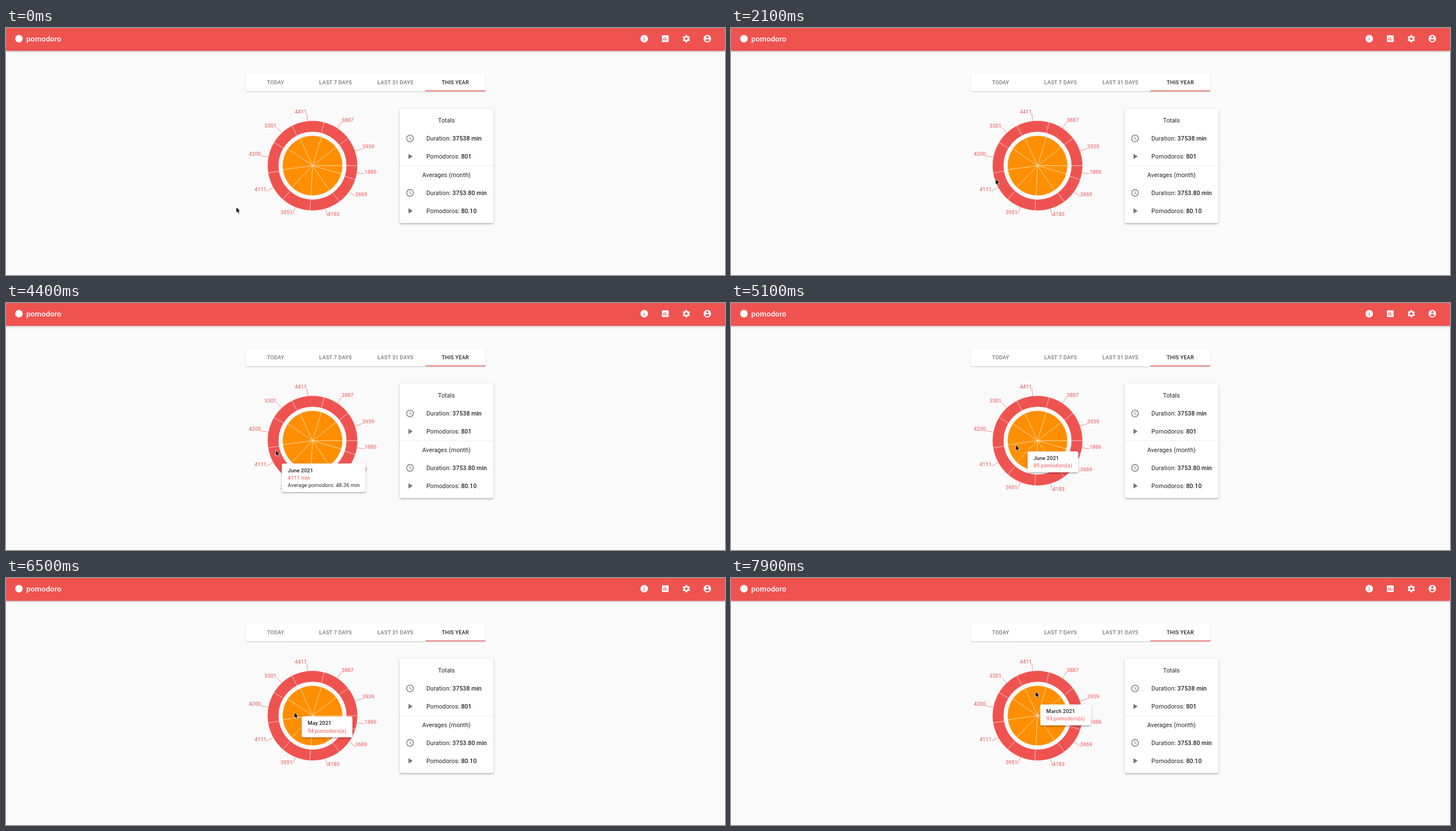
Write an HTML page that moves like this. It is 1276x439 px and loops after 8000 ms.

```html
<!DOCTYPE html>
<html lang="en">
<head>
<meta charset="utf-8">
<title>pomodoro</title>
<style>
html, body { margin: 0; width: 100%; height: 100%; overflow: hidden; background: #fafafa; }
#stage {
  position: absolute; width: 1914px; height: 658.5px; overflow: hidden;
  transform: scale(.666667); transform-origin: 0 0;
  font: 14px Roboto, sans-serif; color: rgba(0,0,0,.87);
}
#stage > * { position: absolute; left: 0; top: 0; }
#stage .bar {
  width: 1914px; height: 60.5px; background: #ef5350;
  box-shadow: 0 2px 4px -1px rgba(0,0,0,.2), 0 4px 5px rgba(0,0,0,.14), 0 1px 10px rgba(0,0,0,.12);
}
.paper {
  background: #fff; border-radius: 4px;
  box-shadow: 0 3px 3px -2px rgba(0,0,0,.2), 0 3px 4px rgba(0,0,0,.14), 0 1px 8px rgba(0,0,0,.12);
}
#stage .tabs {
  left: 638px; top: 120.5px; width: 638px; height: 48px;
  box-shadow: 0 2px 1px -1px rgba(0,0,0,.2), 0 1px 1px rgba(0,0,0,.14), 0 1px 3px rgba(0,0,0,.12);
}
#stage .card { left: 1047.5px; top: 215px; width: 250px; height: 305px; }
#tip { padding: 8px 16px; line-height: 20px; letter-spacing: .01071em; white-space: nowrap; }
#tip b { font-weight: 500; }
#tip div { color: #ef5350; }
svg { overflow: visible; }
text { font-family: Roboto, sans-serif; }
</style>
</head>
<body>
<div id="stage">
  <div class="bar"></div>
  <div class="paper tabs"></div>
  <div class="paper card"></div>
  <svg id="art" width="1914" height="658.5"></svg>
  <div id="tip" class="paper"></div>
  <svg id="cursor" width="14" height="21">
    <path d="M.7 .8V16.5L4.4 13.2 6.9 19 9.6 17.9 7.1 12.2H12Z" stroke="#fff" stroke-width="1.1"/>
  </svg>
</div>
<script>
const RED = '#ef5350', ORANGE = '#ff8f00', GREY = 'rgba(0,0,0,.54)', INK = 'rgba(0,0,0,.87)';
const CX = 816, CY = 367;
const MONTHS = ['January', 'February', 'March', 'April', 'May', 'June', 'July', 'August', 'September', 'October'];
const MINUTES = [3939, 3887, 4411, 3301, 4200, 4111, 3951, 4183, 3669, 1886];
const COUNTS = [84, 78, 93, 69, 94, 85, 91, 83, 88, 36];
const $ = id => document.getElementById(id);
const sum = list => list.reduce((a, b) => a + b, 0);
const mean = list => (sum(list) / list.length).toFixed(2);

// Chart geometry: angles run counterclockwise from three o'clock.
const point = (turn, r) => [CX + r * Math.cos(turn * 2 * Math.PI), CY - r * Math.sin(turn * 2 * Math.PI)];
const slices = values => values.map((v, i) => {
  const before = sum(values.slice(0, i)), total = sum(values);
  return { start: before / total, mid: (before + v / 2) / total };
});
const ring = slices(MINUTES), pie = slices(COUNTS);

// Static drawing
const text = (x, y, str, size = 16, attrs = '', spacing = .00938) =>
  `<text x="${x}" y="${y + size * .342}" font-size="${size}" letter-spacing="${spacing * size}" fill="${INK}" ${attrs}>${str}</text>`;
const line = (a, b, color) => `<path d="M${a}L${b}" stroke="${color}"/>`;
const circle = (x, y, r, fill, stroke = 'none', width = 1) =>
  `<circle cx="${x}" cy="${y}" r="${r}" fill="${fill}" stroke="${stroke}" stroke-width="${width}"/>`;
const box = (x, y, w, h, fill) => `<rect x="${x}" y="${y}" width="${w}" height="${h}" fill="${fill}"/>`;

// Icons are drawn around their centre.
const ICONS = {
  info: circle(0, 0, 10, '#fff') + box(-1, -1, 2, 6, RED) + box(-1, -5, 2, 2, RED),
  stats: `<rect x="-9" y="-9" width="18" height="18" rx="2" fill="#fff"/>` +
    box(-5, -2, 2, 7, RED) + box(-1, -5, 2, 10, RED) + box(3, 1, 2, 4, RED),
  gear: circle(0, 0, 5.4, 'none', '#fff', 3.6) + [0, 1, 2, 3, 4, 5].map(i =>
    `<path d="M-2.2-9.9h4.4l.8 4.5h-6z" fill="#fff" transform="rotate(${60 * i})"/>`).join(''),
  user: circle(0, 0, 10, '#fff') + circle(0, -4, 3, RED) + `<path d="M-6 4C-6 0 6 0 6 4Q0 10-6 4" fill="${RED}"/>`,
  clock: circle(0, 0, 9, 'none', GREY, 2) + `<path d="M-.2-5V.6L4.6 3.5" fill="none" stroke="${GREY}" stroke-width="1.5"/>`,
  play: `<path d="M-4-7V7L7 0z" fill="${GREY}"/>`
};
const icon = (x, y, name) => `<g transform="translate(${x} ${y})">${ICONS[name]}</g>`;

function header() {
  return circle(34.5, 28.5, 10, '#fff') +
    text(54, 28.5, 'pomodoro', 20, 'style="fill:#fff" font-weight="500"', .0075) +
    ['info', 'stats', 'gear', 'user'].map((name, i) => icon(1699 + 56 * i, 28.5, name)).join('');
}

function tabs() {
  return ['TODAY', 'LAST 7 DAYS', 'LAST 31 DAYS', 'THIS YEAR'].map((name, i) =>
    text(717.75 + 159.5 * i, 144.5, name, 14,
      `text-anchor="middle" font-weight="500" style="fill:${i < 3 ? GREY : INK}"`, .02857)).join('') +
    box(1116.5, 166.5, 159.5, 2, RED);
}

function summary() {
  const row = (y, name, label, value) => icon(1075.5, y, name) +
    text(1119, y, `${label}: <tspan font-weight="500">${value}</tspan>`);
  const section = (y, title, of) => text(1172.5, y, title, 16, 'text-anchor="middle"') +
    row(y + 48, 'clock', 'Duration', of(MINUTES) + ' min') + row(y + 96, 'play', 'Pomodoros', of(COUNTS));
  return section(246.5, 'Totals', sum) + box(1047.5, 367, 250, 1, 'rgba(0,0,0,.12)') +
    section(391.5, 'Averages (month)', mean);
}

function chart() {
  let out = circle(CX, CY, 105, 'none', RED, 30) + circle(CX, CY, 80, ORANGE, '#fff') +
    [90, 120].map(r => circle(CX, CY, r, 'none', '#fff')).join('');
  for (const s of pie) out += line([CX, CY], point(s.start, 80), '#fff');
  ring.forEach((s, i) => {
    const end = point(s.mid, 140);
    out += line(point(s.start, 90), point(s.start, 120), '#fff') + line(point(s.mid, 120), end, RED) +
      `<text x="${end[0]}" y="${end[1]}" font-size="14" letter-spacing=".13" fill="${RED}" ` +
      `text-anchor="${end[0] > CX ? 'start' : 'end'}">${MINUTES[i]}</text>`;
  });
  return out;
}
$('art').innerHTML = header() + tabs() + summary() + chart();

// Motion
const LOOP = 8000, STEP = 100;
// The picture refreshes every step, except while it stalls.
const STALLS = [[2500, 2900], [4700, 4900], [5200, 6100], [7400, 7600]];
const floorStep = t => Math.floor(t / STEP) * STEP;
function held(t) {
  const stall = STALLS.find(([a, b]) => t >= a && t < b);
  return stall ? stall[0] : floorStep(t);
}

const mix = (a, b, f) => a + (b - a) * f;

// The pointer glides in, slowing down, then follows a few stops: time, x, y.
const STOPS = [[3000, 473, 267.2], [3100, 478, 260.8], [4400, 478, 260.8], [5200, 508.5, 250], [6100, 510.5, 249.3],
  [6800, 511.5, 230], [7100, 517.7, 218], [7700, 539, 203], [7900, 539.8, 201]];
function pointer(t) {
  const [, x, y] = STOPS[0];
  if (t <= STOPS[0][0]) {
    const left = 1 - Math.min(Math.max((t - 100) / 2400, 0), 1);
    return [mix(x, 408, left ** 1.55), mix(y, 317.6, left ** 2.7)];
  }
  const i = STOPS.findIndex(s => s[0] >= t);
  const a = STOPS[i - 1], b = STOPS[i], f = (t - a[0]) / (b[0] - a[0]);
  return [mix(a[1], b[1], f), mix(a[2], b[2], f)];
}

const target = (slice, r) => point(slice.mid, r).map(v => v + 10);
const ringTip = i => ({ pos: target(ring[i], 105),
  html: `<b>${MONTHS[i]} 2021</b><div>${MINUTES[i]} min</div>Average pomodoro: ${(MINUTES[i] / COUNTS[i]).toFixed(2)} min` });
const pieTip = i => ({ pos: target(pie[i], 40),
  html: `<b>${MONTHS[i]} 2021</b><div>${COUNTS[i]} pomodoro(s)</div>` });

// Each hover starts a slide from the place of the tooltip before it; no html means hidden.
const TIPS = [
  { start: 0, pos: [622, 213] },
  { start: 2384, ...ringTip(5) },
  { start: 4500, pos: target(ring[5], 105) },
  { start: 4766, ...pieTip(5) },
  { start: 6200, ...pieTip(4) },
  { start: 6960, ...pieTip(3) },
  { start: 7370, ...pieTip(2) }
];

// cubic-bezier(.25, .1, .25, 1)
function ease(x) {
  if (x <= 0 || x >= 1) return x <= 0 ? 0 : 1;
  const bez = (a, b, u) => 3 * a * u * (1 - u) ** 2 + 3 * b * u * u * (1 - u) + u ** 3;
  let lo = 0, hi = 1;
  for (let i = 0; i < 24; i++) {
    const m = (lo + hi) / 2;
    if (bez(.25, .25, m) < x) lo = m; else hi = m;
  }
  return bez(.1, 1, lo);
}

const place = (el, x, y) => el.style.transform = `translate(${x}px, ${y}px)`;
let shown;
function draw(now) {
  const t = held(now % LOOP);
  const [x, y] = pointer(t);
  place($('cursor'), x * 1.5, y * 1.5);

  const i = TIPS.filter(tip => floorStep(tip.start) <= t).length - 1;
  const tip = TIPS[i], from = TIPS[Math.max(i - 1, 0)].pos;
  const f = ease((t - tip.start) / 400);
  if (tip !== shown) {
    $('tip').style.visibility = tip.html ? 'visible' : 'hidden';
    $('tip').innerHTML = tip.html || '';
    shown = tip;
  }
  place($('tip'), mix(from[0], tip.pos[0], f), mix(from[1], tip.pos[1], f));
}

const began = performance.now();
function tick() {
  draw(performance.now() - began);
  requestAnimationFrame(tick);
}
tick();
</script>
</body>
</html>
```
